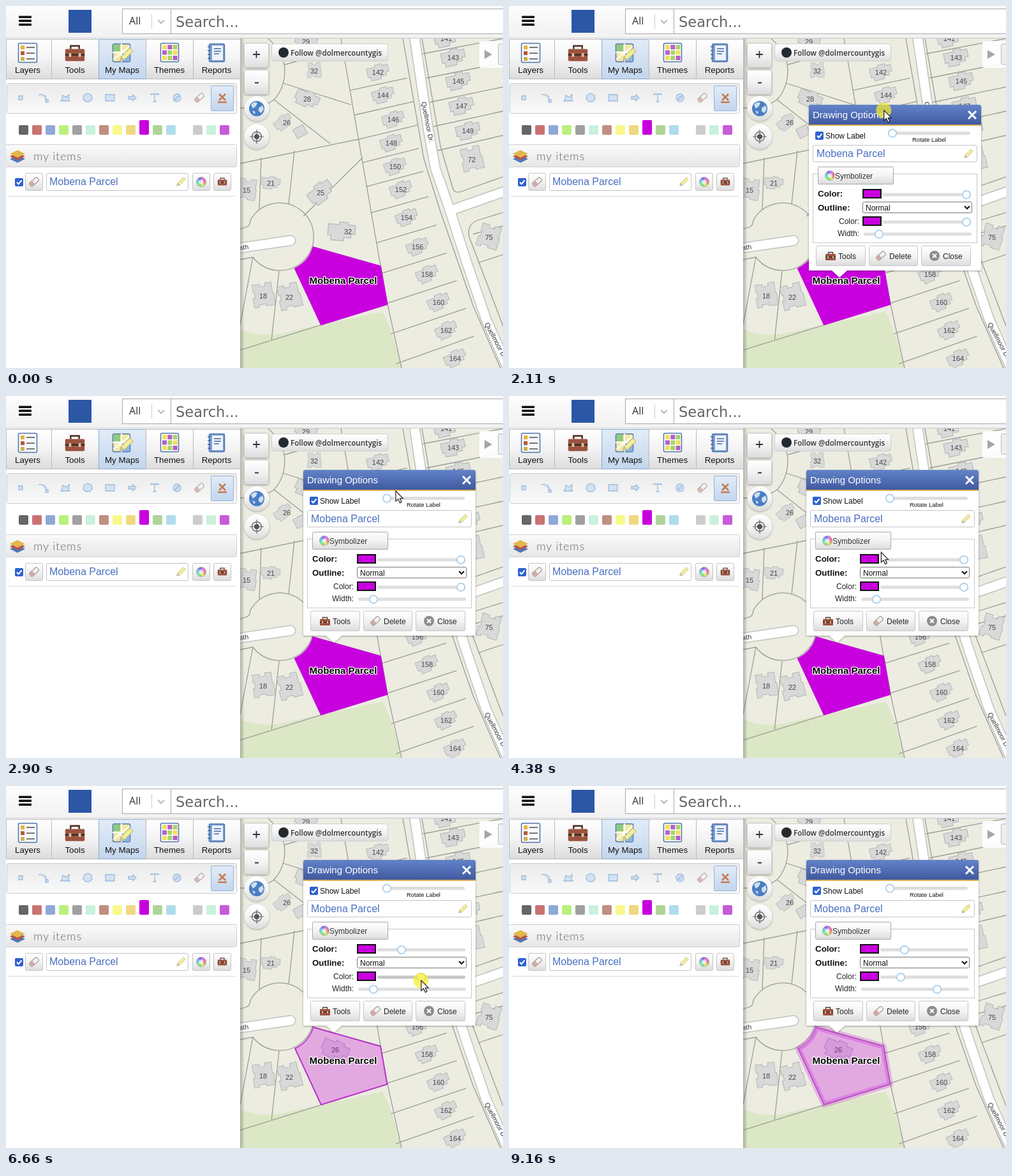
An HTML page that plays this animation: 779x568 px, repeating every 9.24 s.

```html
<!DOCTYPE html>
<html lang="en">
<head>
<meta charset="utf-8">
<title>Drawing options</title>
<style>
html, body { margin: 0; width: 100%; height: 100%; overflow: hidden; background: #fff; }
svg { display: block; width: 100vw; height: 100vh; font-family: "Liberation Sans", Arial, sans-serif; }
.lot { fill: none; stroke: #9d9d98; stroke-width: 1.3; }
.house { fill: #d9d9d9; stroke: #b7b7b7; stroke-width: 1; }
.num { font-size: 11px; fill: #444; text-anchor: middle; }
.road { fill: none; stroke-linecap: round; stroke-linejoin: round; }
.tool { fill: #d3e2f2; stroke: #9dbbdb; stroke-width: 1.3; }
.halo { paint-order: stroke; stroke: #fff; stroke-linejoin: round; }
.knob { fill: #fff; stroke: #a9cfea; stroke-width: 1.8; }
</style>
</head>
<body>
<svg id="stage" viewBox="0 0 779 568"></svg>
<script>
const PURPLE = '#c800de', TRACK = '#dedede', TRACK_ACTIVE = '#c6c6c6';
const LABEL = 'Mobena Parcel', STREET = 'Quellmoor Dr.';

const rect = (x, y, w, h, fill, more = '') =>
  `<rect x="${x}" y="${y}" width="${w}" height="${h}" fill="${fill}" ${more}/>`;
const box = (x, y, w, h, fill, stroke = '#c4c4c4', r = 2, more = '') =>
  rect(x + .5, y + .5, w - 1, h - 1, fill, `stroke="${stroke}" rx="${r}" ${more}`);
const text = (x, y, str, size, fill = '#111', more = '') =>
  `<text x="${x}" y="${y}" font-size="${size}" fill="${fill}" ${more}>${str}</text>`;
const path = (d, more = '') => `<path d="${d}" ${more}/>`;
const circle = (x, y, r, fill, more = '') => `<circle cx="${x}" cy="${y}" r="${r}" fill="${fill}" ${more}/>`;
const icon = (id, x, y, scale = 1, more = '') =>
  `<use href="#${id}" transform="translate(${x} ${y}) scale(${scale})" ${more}/>`;
const group = (inner, more = '') => `<g ${more}>${inner}</g>`;
const grad = (id, ...stops) => `<linearGradient id="${id}" x2="0" y2="1">` +
  stops.map((c, i) => `<stop offset="${i / (stops.length - 1)}" stop-color="${c}"/>`).join('') + '</linearGradient>';
const check = (x, y) => rect(x, y, 13, 13, '#2f62d0', 'rx="2"') +
  path(`M${x + 3} ${y + 6.5}l2.5 3 5-6`, 'fill="none" stroke="#fff" stroke-width="2"');

function wheel() {
  const point = a => `${7.5 * Math.cos(a)} ${7.5 * Math.sin(a)}`;
  let s = '';
  for (let i = 0; i < 8; i++) {
    const a = i * Math.PI / 4;
    s += path(`M0 0L${point(a)}A7.5 7.5 0 0 1 ${point(a + .8)}Z`, `fill="hsl(${i * 45 + 20} 70% 68%)"`);
  }
  return s + circle(0, 0, 3.5, '#fff', 'opacity=".7"') + circle(0, 0, 7.5, 'none', 'stroke="#999" stroke-width=".7"');
}

const defs = `<defs>
  ${grad('head', '#fdfdfd', '#f1f1f1')}${grad('button', '#ffffff', '#f3f3f3', '#dcdcdc')}
  ${grad('active', '#e2ecf8', '#c3d6ed')}${grad('bar', '#ebebeb', '#f2f2f2', '#f9fafb')}
  ${grad('items', '#fbfbfb', '#e6e6e6')}${grad('title', '#6283c9', '#40599f')}
  <linearGradient id="edge"><stop stop-color="#555" stop-opacity=".4"/><stop offset="1" stop-color="#555" stop-opacity="0"/></linearGradient>
  <clipPath id="mapClip">${rect(367, 51, 412, 517, '#fff')}</clipPath>
  <filter id="shadow" x="-10%" y="-10%" width="120%" height="125%"><feDropShadow dx="0" dy="1" stdDeviation="1.5" flood-opacity=".35"/></filter>
  <g id="wheel">${wheel()}</g>
  <g id="eraser"><g transform="rotate(-42)">${rect(-8, -3.5, 16, 7, '#f4f1f1', 'rx="2" stroke="#8d8585"')}${rect(-8, -3.5, 7, 7, '#d3aaa5', 'rx="2"')}</g></g>
  <g id="pencil"><g transform="rotate(-45)">${rect(-5, -2.3, 13, 4.6, '#f3ee9c', 'stroke="#c4bd78" stroke-width=".8"')}${path('M-5-2.3L-9 0L-5 2.3Z', 'fill="#d9c9a0" stroke="#aaa" stroke-width=".6"')}</g></g>
  <g id="toolbox">${path('M-3.5-4v-2.5h7V-4', 'fill="none" stroke="#553a30" stroke-width="1.4"')}${rect(-8, -4, 16, 10, '#9c533f', 'rx="1"')}${rect(-8, 0, 16, 1.6, '#4c2e28')}${rect(-5, -.5, 2, 3, '#d8c9a8')}${rect(3, -.5, 2, 3, '#d8c9a8')}</g>
  <path id="houseA" class="house" d="M-17-8H-3V-11H8V-8H17V3H12V8H3V12H-13V6H-17Z"/>
  <path id="houseB" class="house" d="M-15-18H-4V-14H5V-19H15V-2H17V17H3V14H-8V18H-16V3H-13V-6H-15Z"/>
</defs>`;

// [x, y] of each numbered house along the street
const west = [[583, 104], [591, 140], [607, 178], [604, 215], [610, 252], [619, 288],
  [628, 332], [645, 378], [660, 421], [678, 465], [690, 509], [704, 553]];
const east = [[690, 51], [701, 81], [709, 118], [714, 157], [724, 196]];
// [number, x, y, house dx, angle, scale, shape]
const others = [[72, 730, 241, 0, -12, 1, 'B'], [75, 757, 363, 0, 18, 1, 'B'], [32, 483, 102, 0, 0, .65, 'B'],
  [28, 472, 146, 0, 24, 1.1, 'A'], [26, 440, 183, -6, -35, .85, 'A'], [21, 415, 278, 0, 6, .85, 'A'],
  [25, 493, 293, 0, -38, 1.2, 'A'], [15, 377, 289, 0, 10, .9, 'B'], [32, 536, 354, -10, 4, 1.25, 'A'],
  [18, 403, 455, 0, -8, 1, 'B'], [22, 444, 457, 0, -14, 1.05, 'B'], [29, 470, 56, 0, 15, 1, 'A']];

const house = (n, x, y, dx, angle, scale, shape) =>
  `<use href="#house${shape}" transform="translate(${x + dx} ${y - 1}) rotate(${angle}) scale(${scale})"/>` +
  `<text class="num" x="${x}" y="${y + 4}">${n}</text>`;

function lots() {
  let d = '';
  for (let i = 1; i < west.length; i++) {
    const mx = (west[i][0] + west[i - 1][0]) / 2, my = (west[i][1] + west[i - 1][1]) / 2;
    const slope = .2 + i * .014, x0 = 525 + .174 * (my - 36), x1 = mx + 42 - i * .5;
    d += `M${x0} ${my + slope * (mx - x0)}L${x1} ${my - slope * (x1 - mx)}`;
  }
  for (let i = 1; i <= east.length; i++) {
    const y = 64 + i * 38, x = 648 + i * 5.5;
    d += `M${x} ${y - 27}L779 ${y - 51}`;
  }
  return d + 'M525 51L587 407L598 468L620 568' +
    'M411 51Q437 75 437 103Q436 130 420 147Q400 162 367 160' +
    'M437 92L530 66M434 121L541 155M420 147L508 216M367 247L558 208M400 238L397 319M452 227L443 311' +
    'M466 330L559 238M453 411L494 501M428 416L416 526M387 394L367 500M367 540L598 468' +
    'M367 350L376 347Q383 345 383 336A53 53 0 1 1 387 394L367 398M481 378L587 408' +
    'M652 51L681 220L700 285Q703 295 714 291L779 268' +
    'M622 51L655 240L680 320L732 470L775 568' +
    'M779 324L740 336Q722 342 726 362L779 502M779 345L732 358M740 403L779 390';
}

const roadLines = 'M639 40L662 195L673 255L696 321L722 402L752 490L794 585M696 321L790 288';
const map = group(
  rect(367, 51, 412, 517, '#ecece1') +
  path('M367 507Q400 522 440 512L494 500L590 480Q603 500 620 568H367Z', 'fill="#dce7c6"') +
  path(lots(), 'class="lot"') +
  [['#c2c2be', 17], ['#fff', 14]].map(([c, w]) => path(roadLines + 'M350 382L446 368', `class="road" stroke="${c}" stroke-width="${w}"`)).join('') +
  west.map(([x, y], i) => house(142 + 2 * i, x, y, 0, -14 - i, 1, 'A')).join('') +
  east.map(([x, y], i) => house(141 + 2 * i, x, y, 0, -12, 1.1, 'A')).join('') +
  others.map(h => house(...h)).join('') +
  rect(-9, -8, 18, 16, '', 'class="house" transform="translate(461 197) rotate(-28)"') +
  text(0, 0, STREET, 10.5, '#333', 'transform="translate(651 151) rotate(79)"') +
  text(0, 0, STREET, 10.5, '#333', 'transform="translate(750 499) rotate(62)"') +
  text(366, 383, 'ath', 10.5, '#333', 'transform="rotate(-7 366 383)"') +
  group('', 'id="parcel"') +
  rect(367, 51, 7, 517, 'url(#edge)'), 'clip-path="url(#mapClip)"');

const shadow = 'filter="url(#shadow)"';
const widgets =
  box(373, 58, 39, 39, 'url(#button)', '#ccc', 3, shadow) + path('M387 76h11M392.5 70.5v11', 'stroke="#333" stroke-width="1.8"') +
  box(373, 100, 39, 39, 'url(#button)', '#ccc', 3, shadow) + path('M390 120.5h6', 'stroke="#333" stroke-width="2"') +
  circle(393, 161, 19.5, 'url(#button)', shadow) + circle(393, 161, 12, '#4a7ec4') +
  path('M384 155q5-6 10-3l-2 5-5 4zM396 160l6-4 2 6-4 6-4-3zM386 164l5 2-2 4z', 'fill="#cfdfeb"') +
  circle(393, 205, 19.5, 'url(#button)', shadow) +
  path('M393 194v22M382 205h22', 'stroke="#666" stroke-width="1.2"') +
  circle(393, 205, 7.5, 'none', 'stroke="#666" stroke-width="1.4"') + circle(393, 205, 4, '#555') +
  box(416, 59, 183, 28, 'url(#button)', '#cfcfcf', 4) + circle(435, 73, 8, '#24292e') +
  text(446, 77.5, 'Follow @dolmercountygis', 11.6, '#333', 'font-family="Open Sans, sans-serif" font-weight="600"') +
  rect(742, 55, 37, 42, '#fff', 'rx="3" opacity=".92"') + path('M750 69l12 7-12 7z', 'fill="#a5a5a5"') +
  box(771, 59, 12, 33, '#eee', '#bbb');

const header = rect(0, 0, 779, 51, 'url(#head)') +
  [15.5, 21.5, 27.5].map(y => rect(20, y, 20, 3.5, '#111', 'rx="1"')).join('') +
  rect(98, 6, 36, 36, '#2b57a5') +
  box(182, 4, 600, 40, '#fff', '#aaa', 0) + rect(258, 4, 1, 40, '#aaa') + rect(228, 13, 1, 23, '#ccc') +
  text(193, 29, 'All', 16, '#333', 'font-family="Open Sans, sans-serif"') +
  path('M238 22l5 5 5-5', 'fill="none" stroke="#bbb" stroke-width="2"') +
  text(266, 33, 'Search...', 22.5, '#666', 'font-family="DejaVu Sans, sans-serif"') +
  rect(0, 50, 779, 1, '#c9c9c9');

const tabNames = ['Layers', 'Tools', 'My Maps', 'Themes', 'Reports'], tabEdges = [0, 71, 145, 219, 293, 367];
const page = (x, y, w, h, fill) => box(x, y, w, h, fill, '#4e73aa', 2, 'stroke-width="1.5"');
const tabIcons =
  page(19, 58, 30, 31, '#f7f9fc') + ['#e6b43c', '#b35b3c', '#d1b04a'].map((c, i) =>
    rect(23, 62 + i * 9, 6, 6, c) + rect(32, 64 + i * 9, 13, 2, '#777')).join('') +
  icon('toolbox', 108, 75, 1.9) +
  page(167, 59, 28, 29, '#f3e9a4') + rect(168, 60, 11, 11, '#8fc982') + rect(182, 73, 12, 14, '#87b7e3') +
  path('M167 73h28M181 59v29M168 84l26-21', 'stroke="#fff" stroke-width="2"') + icon('pencil', 188, 77, 1.5) +
  page(242, 58, 29, 30, '#fff') + ['#f2df5f', '#b65ecb', '#a7d46a', '#b65ecb', '#a7d46a', '#f2df5f', '#f2df5f', '#a7d46a', '#b65ecb']
    .map((c, i) => rect(245 + i % 3 * 8.3, 61 + (i / 3 | 0) * 8.5, 7, 7, c)).join('') +
  page(318, 59, 25, 29, '#7d9fd2') + rect(323, 62, 17, 23, '#eef3fa') +
  path('M326 67h11M326 71h11M326 75h8M316 64h5M316 70h5M316 76h5M316 82h5', 'stroke="#456ba5" stroke-width="1.4"');
const tabs = tabNames.map((name, i) => {
  const x = tabEdges[i], w = tabEdges[i + 1] - x;
  return box(x, 52, w + 1, 63, i === 2 ? 'url(#active)' : 'url(#button)', i === 2 ? '#8ca9cc' : '#bbb', 0) +
    text(x + w / 2 + (i ? 0 : -1.5), 105, name, 13.33, '#111', 'text-anchor="middle"');
}).join('') + tabIcons;

const toolShapes = ['M-3-3h6v6h-6z', 'M-7-5h3M-5-5Q5-6 5 3M4 3h4v4h-4z', 'M-6 5L-4-4L1-1L6-5L5 5ZM-8 5h3M4 5h4',
  'M-6-4L0-7L6-4L7 2L3 6H-3L-7 2Z', 'M-7-5H7V5H-7Z', 'M-6-2H1V-5L6 0L1 5V2H-6Z', 'M-6-4V-6H6V-4M0-6V6M-3 6H3', 'M-6 0A6 6 0 1 1 6 0A6 6 0 1 1-6 0M3-3L-1-1L-3 3L1 1Z'];
const toolbar = box(1, 121, 361, 48, 'url(#bar)', '#cacaca', 3) +
  toolShapes.map((d, i) => path(d, `class="tool" transform="translate(${23 + 35 * i} 144)"`)).join('') +
  icon('eraser', 303, 144, 1, 'opacity=".8"') + box(321, 125, 36, 40, 'url(#active)', '#94b4d6', 1) +
  path('M334 138l10 10M344 138l-10 10M332 151h14', 'stroke="#c87850" stroke-width="2.5"');

const paletteColors = ['#666', '#c97272', '#8fa9d6', '#baf07c', '#a0a0a0', '#c9f1dc', '#c08f80', '#f8f88c', '#f0d880',
  PURPLE, '#afd498', '#b0dcec', '', '#cccccc', '#c9f1dc', '#c65bd8'];
const palette = paletteColors.map((c, i) => !c ? '' :
  rect(20 + 21 * i, i === 9 ? 179 : 187, 15, i === 9 ? 23 : 15, c, 'rx="2"')).join('');

const layer = (y, c) => path(`M6 ${y}l12-6 12 6-12 6z`, `fill="${c}"`);
const items = box(-2, 217, 364, 36, 'url(#items)', '#d0d0d0') +
  layer(240, '#4c79bd') + layer(236, '#b3564a') + layer(232, '#e3b74b') +
  text(43, 241.5, 'my items', 18, '#666', 'font-family="Lato, sans-serif" font-weight="300" letter-spacing=".8"') +
  check(14, 270) + box(30, 262, 28, 28, 'url(#button)') + icon('eraser', 44, 276) +
  box(63, 262, 223, 28, '#fff') + text(68, 281, LABEL, 16, '#4a6fc0') + icon('pencil', 274, 276) +
  box(292, 262, 28, 28, 'url(#button)') + icon('wheel', 306, 276) +
  rect(293, 263, 26, 26, 'none', 'id="focus" stroke="#111" stroke-width="2" rx="3"') +
  box(325, 262, 28, 28, 'url(#button)') + icon('toolbox', 339, 276, .9) + rect(3, 298, 357, 1, '#d9d9d9');

const slider = (id, x, y, w) => rect(x, y - 2.5, w, 5, TRACK, `id="${id}Track" rx="2.5"`) + `<circle id="${id}" class="knob" cy="${y}" r="6.2"/>`;
const swatch = y => rect(85, y + 1, 28, 13, PURPLE, 'stroke="#111" stroke-width="2"');
const button = (x, w, label, tx, art) => box(x, 221, w, 32, 'url(#button)', '#c6c6c6') + art + text(tx, 241.5, label, 12, '#222');
const dialog = group(
  group(path('M3 0H267Q270 0 270 3V260H60L48 271L36 260H0V3Q0 0 3 0Z', 'fill="#fff"'), shadow) +
  path('M0 31V3Q0 0 3 0H267Q270 0 270 3V31Z', 'fill="url(#title)"') + rect(0, 31, 270, 2, '#dcae55') +
  text(6, 21, 'Drawing Options', 15, '#fff') + path('M250 10l12 12M262 10l-12 12', 'stroke="#fff" stroke-width="3"') +
  check(10, 42) + text(26, 53, 'Show Label', 12) + slider('rotate', 131, 44.5, 122) + text(162, 58, 'Rotate Label', 9.33) +
  box(6, 63, 258, 27, '#fff') + text(12, 82, LABEL, 16, '#4a6fc0') + icon('pencil', 250, 77) +
  box(6, 108, 258, 109, 'none', '#c8c8c8', 0) + box(14, 97, 119, 28, 'url(#button)', '#a8a8a8', 1) + icon('wheel', 33, 111) +
  text(41, 116, 'Symbolizer', 12, '#333') +
  text(14, 144, 'Color:', 13.33, '#111', 'font-weight="bold"') + swatch(132) + slider('fill', 116, 141, 138) +
  text(14, 166, 'Outline:', 13.33, '#111', 'font-weight="bold"') + box(84, 152, 172, 18, '#fff', '#777') +
  text(89, 165.5, 'Normal', 12) + path('M244 159l4 4 4-4', 'fill="none" stroke="#111" stroke-width="2"') +
  text(79, 187, 'Color:', 12, '#222', 'text-anchor="end"') + swatch(175) + slider('line', 116, 184, 138) +
  text(79, 206, 'Width:', 12, '#222', 'text-anchor="end"') + slider('width', 86, 203, 169) +
  button(11, 78, 'Tools', 46, icon('toolbox', 34, 238)) + button(94, 77, 'Delete', 126, icon('eraser', 113, 237)) +
  button(176, 78, 'Close', 210, circle(197, 237, 8, '#8c8c8c') + path('M194 234l6 6M200 234l-6 6', 'stroke="#fff" stroke-width="2"')),
  'id="dialog"');

const pointer = group(circle(-.5, 0, 12, '#f7ec2c', 'id="press" opacity=".72"') +
  path('M0 0V16L3.7 12.6L6.4 18.7L9 17.5L6.4 11.7H11.3Z', 'fill="#fff" stroke="#111" stroke-width="1.1"'), 'id="cursor"');

document.getElementById('stage').innerHTML = defs + map + widgets + rect(0, 51, 367, 517, '#fff') +
  header + tabs + toolbar + palette + items + dialog + pointer;

const $ = id => document.getElementById(id);
const shape = 'M481.500 378.500L587 408.500L597.500 468L494 500L453 412Q475 401 481.500 378.500Z';
$('parcel').innerHTML =
  house(26, 516, 414, 0, 25, 1.25, 'A') +
  path(shape, `id="area" fill="${PURPLE}"`) +
  path(shape, `id="band" fill="none" stroke="${PURPLE}" stroke-linejoin="round"`) +
  path(shape, `id="rim" fill="none" stroke="#a81fbd" stroke-width="1.6"`) +
  group(text(528.5, 436, LABEL, 15, '#000', 'class="halo" stroke-width="2.6" font-weight="bold" text-anchor="middle"'), 'id="label"');

// Key points: time, then values; linear in between
const cursorKeys = [[70, 693, 560], [850, 305, 264], [1200, 305, 264], [1400, 477, 222], [1870, 594, 175], [1960, 594, 175],
  [2350, 578, 146], [2650, 584, 125], [2720, 584, 125], [2900, 611, 149], [3130, 597, 160], [3370, 597, 160], [3750, 634, 161],
  [3910, 634, 161], [4200, 597, 161], [4380, 583, 245], [4770, 711, 254], [4850, 713, 257], [5010, 713, 257], [5480, 620, 258],
  [5640, 620, 258], [5870, 711, 295], [6110, 714, 305], [6340, 714, 305], [6660, 651, 305], [6890, 614, 305],
  [7130, 614, 305], [7350, 575, 348], [7600, 576, 320], [7760, 576, 320], [8310, 671, 320], [8470, 671, 320], [8860, 744, 570]];
const dialogKeys = [[1960, 476, 166], [2350, 460, 137], [2650, 466, 116]];
const rotateKeys = [[3370, 131], [3750, 168], [3910, 168], [4200, 131]];
const fillKeys = [[5010, 247], [5480, 154]];
const lineKeys = [[6340, 247], [6660, 185], [6890, 148]];
const widthKeys = [[7760, 110], [8310, 205]];
const presses = [[850, 1010], [1960, 2700], [3300, 4200], [4930, 5560], [6110, 6970], [7680, 8390]];

function at(keys, t) {
  const i = keys.findIndex(k => k[0] > t);
  if (i === 0) return keys[0].slice(1);
  if (i < 0) return keys[keys.length - 1].slice(1);
  const [a, b] = [keys[i - 1], keys[i]], p = (t - a[0]) / (b[0] - a[0]);
  return a.slice(1).map((v, j) => v + (b[j + 1] - v) * p);
}
const set = (id, name, value) => $(id).setAttribute(name, value);
const show = (id, on) => set(id, 'visibility', on ? 'visible' : 'hidden');
const between = (t, a, b) => t >= a && t < b;

function draw(t) {
  const [rotate] = at(rotateKeys, t), [fill] = at(fillKeys, t), [line] = at(lineKeys, t), [width] = at(widthKeys, t);
  Object.entries({ rotate, fill, line, width }).forEach(([id, x]) => set(id, 'cx', x));
  const active = { rotate: [3370, 4200], fill: [5010, 5640], line: [6180, 7130], width: [7760, 9160] };
  for (const id in active) set(id + 'Track', 'fill', between(t, ...active[id]) ? TRACK_ACTIVE : TRACK);

  set('area', 'opacity', (fill - 117) / 130);
  set('band', 'opacity', (line - 117) / 130);
  set('band', 'stroke-width', 2 + (width - 110) * .075);
  set('rim', 'opacity', fill < 247 ? .45 : 0);
  set('label', 'transform', `rotate(${(rotate - 131) * 2.95} 528.5 431)`);

  show('focus', between(t, 1010, 1960));
  show('dialog', t >= 1090);
  set('dialog', 'transform', `translate(${at(dialogKeys, t).map(Math.round)})`);
  show('cursor', between(t, 70, 8860));
  set('cursor', 'transform', `translate(${at(cursorKeys, t)})`);
  set('press', 'opacity', presses.some(p => between(t, ...p)) ? .72 : 0);
}

const start = performance.now();
function frame() {
  draw((performance.now() - start) % 9240);
  requestAnimationFrame(frame);
}
frame();
</script>
</body>
</html>
```
